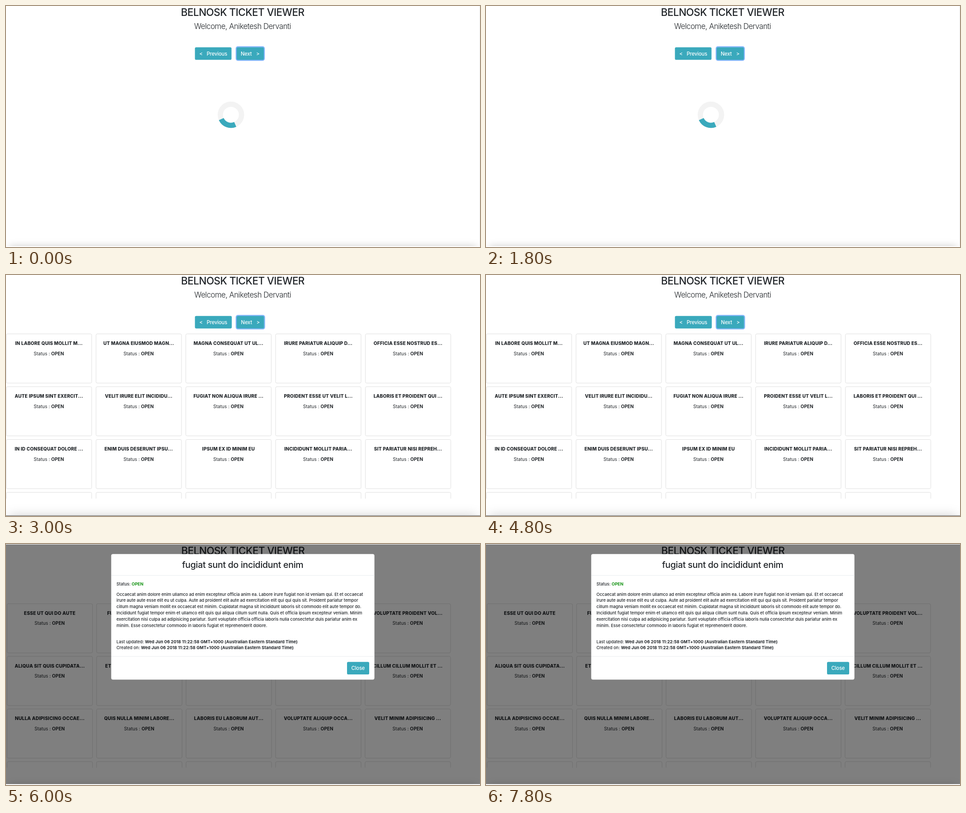
Animation, 1048 px wide and 534 px high, one loop 9 s. Source, as an HTML page:

```html
<!DOCTYPE html>
<html lang="en">
<head>
<meta charset="utf-8">
<title>Ticket viewer</title>
<style>
  html, body { margin: 0; width: 100%; height: 100%; overflow: hidden; background: #fff; }
  svg { display: block; width: 1048px; height: 534px; }
  text { font-family: Inter, "Open Sans", sans-serif; font-optical-sizing: none; fill: #212529; white-space: pre; }
  .mid { text-anchor: middle; }
  .title { font-size: 22.5px; font-weight: 500; letter-spacing: -.57px; }
  .sub { font-size: 16.8px; font-weight: 350; letter-spacing: -.55px; }
  .btn { font-size: 11.2px; font-weight: 500; letter-spacing: -.14px; fill: #fff; }
  .name { font-size: 10.2px; font-weight: 800; letter-spacing: .16px; }
  .status { font-size: 10px; letter-spacing: .05px; }
  .head { font-size: 19.6px; font-weight: 500; letter-spacing: -.32px; }
  .body { font-size: 9.28px; font-weight: 450; }
  .strong { font-weight: 700; letter-spacing: .09px; }
  .card { fill: #fff; stroke: #dfdfdf; }
</style>
</head>
<body>
<svg id="stage" viewBox="0 0 1048 534">
  <defs>
    <clipPath id="list"><rect width="1048" height="495.5"/></clipPath>
    <clipPath id="page"><rect width="1048" height="532"/></clipPath>
  </defs>
</svg>
<script>
const TEAL = '#3aa9bc';
const stage = document.getElementById('stage');

const text = (cls, x, y, s) => `<text class="${cls}" x="${x}" y="${y}">${s}</text>`;
const rect = (x, y, w, h, attrs) => `<rect x="${x}" y="${y}" width="${w}" height="${h}" ${attrs}/>`;
const line = (x1, x2, y, color) => rect(x1, y, x2 - x1, 1, `fill="${color}"`);

const header = (x, y) =>
  text('title mid', x, y, 'BELNOSK TICKET VIEWER') +
  text('sub mid', x - .3, y + 29, 'Welcome, Aniketesh Dervanti');

const button = (x, y, w) => rect(x, y, w, 27.7, `rx="2.8" fill="${TEAL}"`);

const pager = (y, grow) =>
  button(417.7, y, 80.9 + grow) +
  rect(509, y - 1, 62 + grow, 29.7, 'rx="3.6" fill="none" stroke="#80b4fb" stroke-width="2.4"') +
  button(510, y, 60 + grow) +
  text('btn', 427.5, y + 18, '&lt;') +
  text('btn', 443.8, y + 18, 'Previous') +
  text('btn', 519 + grow, y + 18, 'Next') +
  text('btn', 553.2 + grow, y + 18, '&gt;');

const card = (x, y, name) =>
  rect(x, y, 189, 109, 'rx="3" class="card"') +
  (name ? text('name mid', x + 94.4, y + 24.7, name) +
    text('status mid', x + 94.2, y + 47.1, 'Status : <tspan class="strong">OPEN</tspan>') : '');

// Three full rows of five, then the tops of an unfinished row
const cards = (x, y, dx, dy, names) => {
  let out = '';
  for (let i = 0; i < 20; i++) out += card(x + i % 5 * dx, y + Math.floor(i / 5) * dy, names[i]);
  return `<g clip-path="url(#list)">${out}</g>`;
};

const shadow = (blur, alpha) => `<g clip-path="url(#page)">` +
  rect(8, 532, 1032, 60, `fill="#000" fill-opacity="${alpha}" style="filter:blur(${blur}px)"`) + '</g>';

const spinner = (cx, cy, r, from) => {
  const at = deg => {
    const a = deg * Math.PI / 180;
    return `${cx + r * Math.cos(a)} ${cy + r * Math.sin(a)}`;
  };
  return `<g fill="none" stroke-width="11.6"><circle cx="${cx}" cy="${cy}" r="${r}" stroke="#f3f3f3"/>` +
    `<path d="M${at(from)}A${r} ${r} 0 0 1 ${at(from + 90)}" stroke="${TEAL}"/></g>`;
};

const firstPage = [
  'IN LABORE QUIS MOLLIT M...', 'UT MAGNA EIUSMOD MAGN...', 'MAGNA CONSEQUAT UT UL...',
  'IRURE PARIATUR ALIQUIP D...', 'OFFICIA ESSE NOSTRUD ES...',
  'AUTE IPSUM SINT EXERCIT...', 'VELIT IRURE ELIT INCIDIDU...', 'FUGIAT NON ALIQUA IRURE ...',
  'PROIDENT ESSE UT VELIT L...', 'LABORIS ET PROIDENT QUI ...',
  'IN ID CONSEQUAT DOLORE ...', 'ENIM DUIS DESERUNT IPSU...', 'IPSUM EX ID MINIM EU',
  'INCIDIDUNT MOLLIT PARIA...', 'SIT PARIATUR NISI REPREH...'
];
const secondPage = [
  'ESSE UT QUI DO AUTE', 'FUGIAT SUNT DO INCIDID...', '', '', 'VOLUPTATE PROIDENT VOL...',
  'ALIQUA SIT QUIS CUPIDATA...', 'ET VELIT DOLORE IN ALIQU...', '', '', 'CILLUM CILLUM MOLLIT ET ...',
  'NULLA ADIPISICING OCCAE...', 'QUIS NULLA MINIM LABORE...', 'LABORIS EU LABORUM AUT...',
  'VOLUPTATE ALIQUIP OCCA...', 'VELIT MINIM ADIPISICING ...'
];
const details = [
  'Occaecat anim dolore enim ullamco ad enim excepteur officia anim ea. Labore irure fugiat non id veniam qui. Et et occaecat',
  'irure aute aute esse elit eu ut culpa. Aute ad proident elit aute ad exercitation elit qui qui quis sit. Proident pariatur tempor',
  'cillum magna veniam mollit ex occaecat est minim. Cupidatat magna sit incididunt laboris sit commodo elit aute tempor do.',
  'Incididunt fugiat tempor enim et ullamco elit quis qui aliqua cillum sunt nulla. Quis et officia ipsum excepteur veniam. Minim',
  'exercitation nisi culpa ad adipisicing pariatur. Sunt voluptate officia officia laboris nulla consectetur duis pariatur anim ex',
  'minim. Esse consectetur commodo in laboris fugiat et reprehenderit dolore.'
];
const stamp = '<tspan class="strong">Wed Jun 06 2018 11:22:58 GMT+1000 (Australian Eastern Standard Time)</tspan>';

const modal = () =>
  rect(232.6, 22.2, 582, 278.2, 'rx="4" fill="#fff"') +
  text('head mid', 523.3, 53, 'fugiat sunt do incididunt enim') +
  line(233, 814.5, 69, '#e9ecef') +
  text('body', 244.3, 92, 'Status: <tspan class="strong" style="fill:#149314">OPEN</tspan>') +
  details.map((s, i) => text('body', 244.3, 114.6 + i * 13.87, s)).join('') +
  text('body', 244.3, 219.5, 'Last updated: ' + stamp) +
  text('body', 244.3, 233.4, 'Created on: ' + stamp) +
  line(233, 814.5, 248.6, '#e9ecef') +
  button(754, 261.3, 49) +
  text('btn mid', 778.4, 279.2, 'Close');

const scenes = [
  header(523.2, 22) + pager(91.5, 0) + spinner(497.3, 241, 23.4, 66) +
    shadow(8, .2) + rect(1047, 0, 1, 532, 'fill="#ececec"'),
  header(523.5, 21) + pager(90.7, .6) + cards(.5, 130.5, 198.5, 117, firstPage) +
    shadow(12, .16) + line(0, 1048, 532.7, '#4a4a4a'),
  header(524, 23) + cards(2.3, 132.3, 197.9, 116.6, secondPage) + shadow(8, .12) +
    rect(0, 1, 1048, 531, 'fill="#000" fill-opacity=".5"') + modal()
].map(markup => {
  const g = document.createElementNS('http://www.w3.org/2000/svg', 'g');
  g.innerHTML = markup;
  return stage.appendChild(g);
});

function draw() {
  const current = Math.floor(performance.now() % 9000 / 3000);
  scenes.forEach((g, i) => { g.style.display = i === current ? '' : 'none'; });
  requestAnimationFrame(draw);
}
draw();
</script>
</body>
</html>
```
